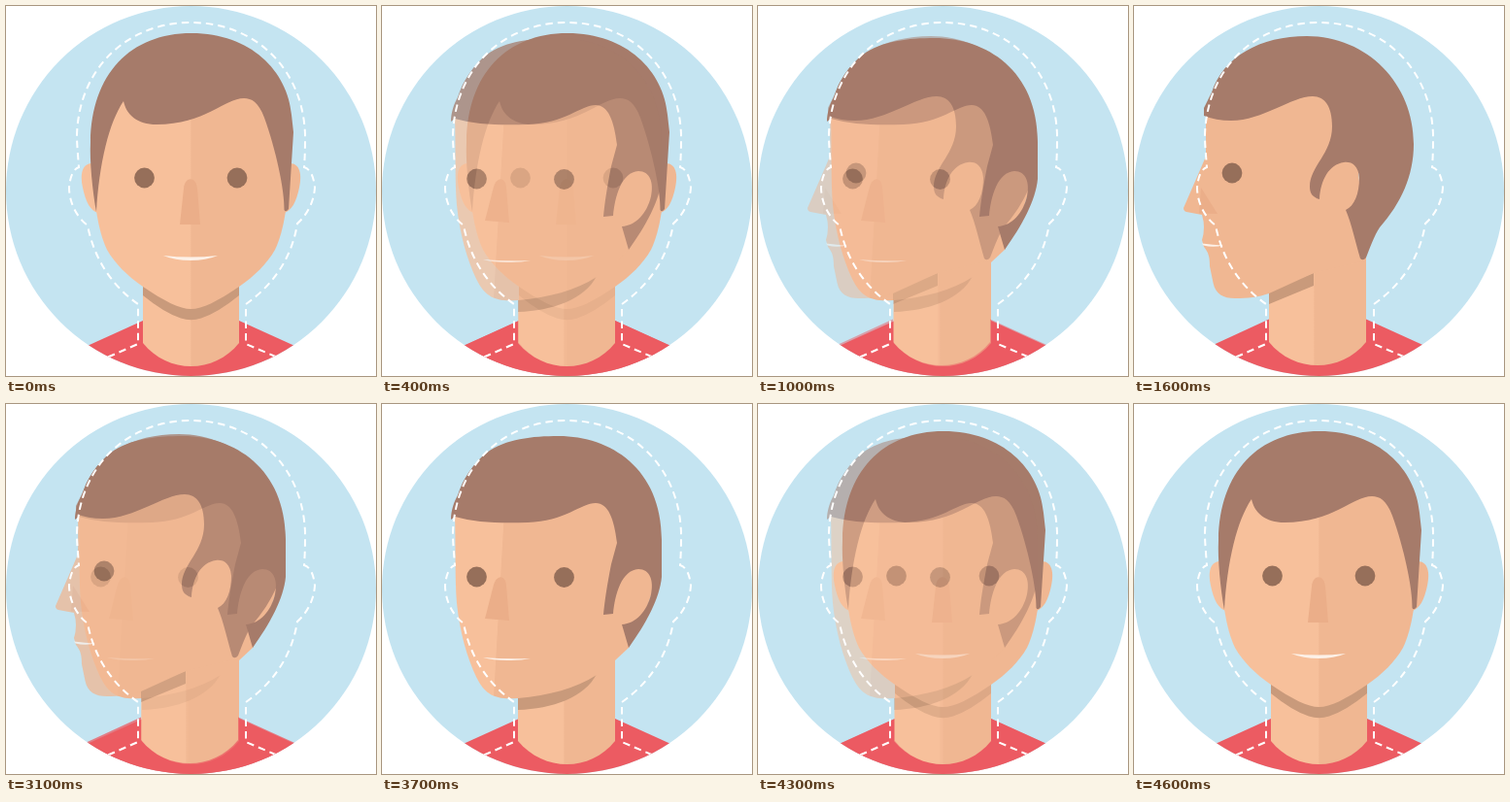
Animation, 381 px wide and 381 px high, one loop 5600 ms. Source, as an HTML page:

```html
<!DOCTYPE html>
<html lang="en">
<head>
<meta charset="utf-8">
<title>Turning head</title>
<style>
  html, body { margin: 0; width: 100%; height: 100%; overflow: hidden; background: #fff; }
  svg { display: block; width: 381px; height: 381px; }
  .hair { fill: #a67b6a; }
  .eye { fill: #966f5a; }
  .shirt { fill: #ec5b62; }
  .shade { fill: #c99a7b; }
  .nose { fill: #ebae89; }
  .mouth { fill: #fdf1e8; }
  .skin { fill: #f0b792; }
  .front .skin { fill: url(#skinFront); }
  .turn .face { fill: url(#skinTurn); }
  .turn .neck { fill: url(#neckTurn); }
  .side .neck { fill: url(#neckSide); }
  .guide { fill: none; stroke: #fff; stroke-width: 2; stroke-dasharray: 7.5 5; }
  .turn, .side { opacity: 0; }
</style>
</head>
<body>
<svg viewBox="0 0 381 381">
  <defs>
    <clipPath id="disc"><circle cx="190.5" cy="190.5" r="190.5"/></clipPath>
    <linearGradient id="skinFront" gradientUnits="userSpaceOnUse" x1="190" x2="190.8" y1="0" y2="0">
      <stop offset="0" stop-color="#f7c09b"/><stop offset="1" stop-color="#f0b792"/>
    </linearGradient>
    <linearGradient id="skinTurn" href="#skinFront" x1="121" x2="121.8" y1="190" y2="190.046"/>
    <linearGradient id="neckTurn" href="#skinFront" x1="187" x2="187.8"/>
    <linearGradient id="neckSide" href="#skinFront" x1="185" x2="185.8"/>
  </defs>
  <g clip-path="url(#disc)">
    <rect width="381" height="381" fill="#c4e4f1"/>

    <g class="front">
      <path class="shirt" d="M77 353L141 324H240L304 353V381H77Z"/>
      <path class="skin" d="M141 280H240V347C214 379 167 379 141 347Z"/>
      <path class="shade" d="M141 285V298Q163 316 180 321.500Q190.500 325 201 321.500Q218 316 240 298V285Z"/>
      <path class="skin" d="M90 162C78 161 76 174 79 187C82 202 87 211 95 213Z"/>
      <path class="skin" d="M291 162C303 161 305 174 302 187C299 202 294 211 286 213Z"/>
      <path class="skin" d="M93 100V211C96 230 99 240 104 251C112 265 125 278 141 289C163 304 179 312 190.500 312C202 312 218 304 240 289C256 278 269 265 277 251C282 240 285 230 288 211V100C270 50 110 50 93 100Z"/>
      <path class="nose" d="M179 225L183 188C184 175 196 175 197 188L200 225Z"/>
      <path class="mouth" d="M162 257Q190 260 218 257Q206 262 190 262Q174 262 162 257Z"/>
      <path class="hair" d="M93 212C89 190 86 160 87 140C88 70 128 28 191 28C252 28 290 67 294 112L296 130L291 209Q288 213 286.500 210C287 190 278 148 266 115C260 99 253 95 245 95C225 95 205 122 155 122C135 122 124 112 121 98C106 120 96 162 93 212Z"/>
      <circle class="eye" cx="142.500" cy="177" r="10.400"/>
      <circle class="eye" cx="238" cy="177" r="10.400"/>
    </g>

    <g class="turn">
      <path class="shirt" d="M77 353L141 324H240L304 353V381H77Z"/>
      <path class="skin neck" d="M140 260H240V347C214 379 167 379 140 347Z"/>
      <path class="shade" d="M140 302V315C175 314 209 302 221 278Z"/>
      <path class="skin face" d="M75 112C76 150 75 180 77 205C80 235 88 262 97 281C106 299 116 305 140 303C172 300 199 293 221 279L240 264L254 251L272 212L281 185V120L230 70H100Z"/>
      <path class="nose" d="M106 221L115 186C118 176 127 175 128 187L131 223Z"/>
      <path class="mouth" d="M104 261Q128 263 153 262Q142 264.500 129 264Q114 264 104 261Z"/>
      <path class="hair" d="M71 119C71 110 74 101 78 94C83 77 95 60 108 50C127 36 155 33 182 33C235 33 288 66 288 140V178C286 200 272 226 254 251L247 227C262 226 273 213 277 196C280 182 276 170 264 170C247 171 240 195 238 216L228 217C229 205 232 185 236 165L242 143C239 118 233 102 220 102C205 102 188 121 150 122C120 123 96 122 75 116Z"/>
      <circle class="eye" cx="97.500" cy="178" r="10.400"/>
      <circle class="eye" cx="187.500" cy="178.500" r="10.400"/>
    </g>

    <g class="side">
      <path class="shirt" d="M75 352L139 322.500H239L304 352V381H75Z"/>
      <path class="skin neck" d="M139 250H239V346C213 378 165 378 139 346Z"/>
      <path class="shade" d="M139 293L185 275V288L139 307Z"/>
      <path class="skin" d="M74 105V155L51 208Q51 211 54 212L70 215Q74 228 70 241L72 248C77 254 78 259 78 268L81.500 285C84 297 92 301 104 301C117 301 128 300 139 296L185 275L239 262L225 100L150 80Z"/>
      <path class="nose" d="M69 187L86 214L67 213.500Z"/>
      <path class="mouth" d="M70 244.500Q81 246 92 246.500Q81 249 71.500 246.500Z"/>
      <path class="hair" d="M72 113V105L80 89C92 52 130 31 178 31C240 31 288 80 288 142C288 175 275 203 253 228C247 237 243 249 239 259Q236 263 233 260C228 243 224 224 218 210C227 206 232 193 232 177C231 164 224 160 216 161C201 163 192 179 191 199C184 197 181 193 181 186C181 165 204 152 204 124C204 104 197 93 184 93C162 93 133 118 100 118Q84 118 72 113Z"/>
      <circle class="eye" cx="101" cy="172" r="10.400"/>
    </g>

    <path class="guide" d="M105 361.500L136 348V307C109 288 91 261 84 226C72 217 65 201 65 187C66 176 69 168 75 166C74 152 73 143 73 133C75 64 125 17 190.500 17C256 17 306 64 308 133C308 143 308 152 307 166C314 168 317 177 318 187C317 201 311 214 300 224C294 261 274 288 247 307V348L280 362"/>
  </g>
</svg>
<script>
  const LOOP = 5600;

  // [start in ms, opacity]; each value holds until the next
  const steps = {
    front: [[0, 1], [700, 0], [4000, 1]],
    turn: [[0, 0], [100, .5], [400, .75], [700, 1], [1600, 0], [3100, 1], [4000, .75], [4300, .5], [4600, 0]],
    side: [[0, 0], [1000, .5], [1300, .75], [1600, 1], [3100, .75], [3400, .5], [3700, 0]]
  };

  for (const [name, table] of Object.entries(steps)) {
    const frames = table.map(([ms, opacity]) => ({ offset: ms / LOOP, opacity, easing: 'steps(1, end)' }));
    frames.push({ offset: 1, opacity: table[table.length - 1][1] });
    const anim = document.querySelector('.' + name).animate(frames, { duration: LOOP, iterations: Infinity });
    anim.startTime = 0;
  }
</script>
</body>
</html>
```
